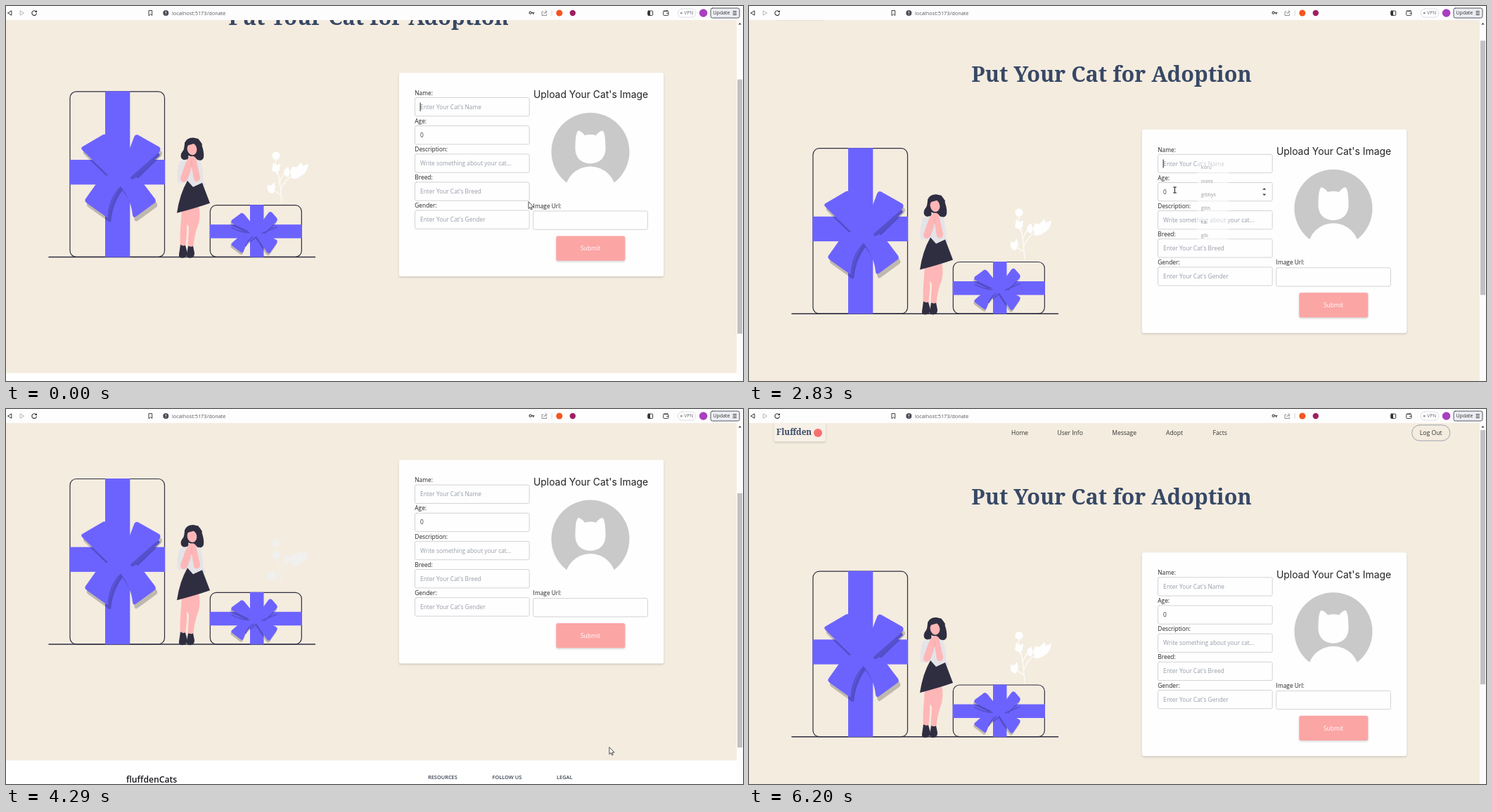
An HTML page with a canvas that plays this animation: 1048x534 px, repeating every 6300 ms.

```html
<!DOCTYPE html>
<html lang="en">
<head>
<meta charset="utf-8">
<title>Put Your Cat for Adoption</title>
<style>
html, body { margin: 0; width: 100%; height: 100%; overflow: hidden; background: #fff; }
canvas { display: block; width: 1048px; height: 534px; }
</style>
</head>
<body>
<canvas id="stage" width="1048" height="534"></canvas>
<script>
const g = document.getElementById('stage').getContext('2d');
const LOOP = 6300, STEP = LOOP / 50;
const SANS = '"Open Sans", "Noto Sans", sans-serif';
const SERIF = '"Noto Serif", serif';
const INK = '#2f2e41', VIOLET = '#6c63ff', SHADE = '#5650cc', SKIN = '#ffb6b6', PAPER = '#fefefe', BG = '#f4ecdf';

const ease = (t, from, to) => {
  const k = Math.min(1, Math.max(0, (t - from) / (to - from)));
  return k * k * (3 - 2 * k);
};
const within = (t, a, b) => t >= a && t < b;

const scrollAt = t => 109.3 + ease(t, 0, 120)
  - 55.3 * ease(t, 750, 1030)
  - 55 * ease(t, 2650, 2900)
  + 131.7 * ease(t, 3430, 3900)
  - 131.7 * ease(t, 4290, 4530);

// resting places of the mouse: time, x, y
const STOPS = [[0, 743, 279], [370, 800, 303], [740, 598, 277.5], [1500, 618, 221.5], [1880, 616, 195],
  [2770, 605.5, 262], [3900, 586, 312.5], [4280, 858, 482], [4530, 751, 446], [5050, 751, 446], [5530, 985, 560]];
function mouseAt(t) {
  let [, x, y] = STOPS[0];
  for (let i = 1; i < STOPS.length; i++) {
    const k = ease(t, STOPS[i - 1][0], STOPS[i][0]);
    x += (STOPS[i][1] - x) * k;
    y += (STOPS[i][2] - y) * k;
  }
  return [x, y];
}

function text(str, x, y, size, color, { font = SANS, weight = 400, align = 'left' } = {}) {
  g.font = `${weight} ${size}px ${font}`;
  g.fillStyle = color;
  g.textAlign = align;
  g.fillText(str, x, y + size * 0.35);
}
function rect(x, y, w, h, color) {
  g.fillStyle = color;
  g.fillRect(x, y, w, h);
}
function box(x, y, w, h, r, fill, stroke, line = 1) {
  g.beginPath();
  g.roundRect(x, y, w, h, r);
  if (fill) { g.fillStyle = fill; g.fill(); }
  if (stroke) { g.strokeStyle = stroke; g.lineWidth = line; g.stroke(); }
}
function raised(x, y, w, h, r, fill) {
  g.save();
  g.shadowColor = 'rgba(0,0,0,.16)';
  g.shadowBlur = 3;
  g.shadowOffsetY = 1.5;
  box(x, y, w, h, r, fill);
  g.restore();
}
function disc(x, y, rx, color, ry = rx, turn = 0) {
  g.beginPath();
  g.ellipse(x, y, rx, ry, turn, 0, 7);
  g.fillStyle = color;
  g.fill();
}
const paths = {};
const path = d => paths[d] || (paths[d] = new Path2D(d));
function fill(d, color) {
  g.fillStyle = color;
  g.fill(path(d));
}
function line(d, color, w) {
  g.strokeStyle = color;
  g.lineWidth = w;
  g.lineCap = g.lineJoin = 'round';
  g.stroke(path(d));
}

const BIG_BOW = 'M108 310Q106 312 109 315L145 350Q135 352 130 360L113 384Q111 387 115 390L143 410' +
  'Q147 413 147 407C149 392 154 378 163 366C172 378 179 392 180 407Q181 412 185 409L211 390' +
  'Q214 388 212 384L196 363Q191 355 182 352L218 317Q221 313 218 310L188 293Q184 291 182 296L176 312' +
  'L163 322L143 293Q140 291 137 293Z';
const SMALL_BOW = 'M356 427L339 406Q335 402 332 406L321 414Q319 417 322 419L345 430Q331 437 321 447' +
  'Q319 449 322 451L334 460Q337 462 338 458L342 448L356 437L371 460Q374 463 376 460L385 447' +
  'Q387 444 384 442L367 433L384 417Q387 414 385 411L378 403Q375 401 373 404Z';

function gift(x, y, w, h, ribbonX, ribbonY, ribbonW) {
  box(x, y, w, h, 9, null, INK, 1.2);
  rect(ribbonX, y - .5, ribbonW, h + .7, VIOLET);
  rect(x - .6, ribbonY, w + 1.2, ribbonW, VIOLET);
}
function bow(d, dx, dy) {
  g.save();
  g.translate(dx, dy);
  fill(d, 'rgba(0,0,0,.22)');
  g.restore();
  fill(d, VIOLET);
}

function gifts() {
  line('M61 466.7H439.5', INK, 1.5);
  gift(91, 231.2, 134.5, 235.5, 141, 328.3, 35.3);
  bow(BIG_BOW, 2.5, 6);
  fill('M177 353L217 318L219 322L183 355Q177 358 177 353Z', SHADE);
  fill('M163 366C155 375 148 390 147 410L145 417C143 398 151 376 163 366Z', SHADE);
  gift(290.3, 393, 130, 73.7, 347, 420.5, 19.5);
  bow(SMALL_BOW, -1, 3);
  line('M321 425Q337 433 346 432M364 433L385 424M341 451Q344 443 351 438', SHADE, 1.6);
}

function woman() {
  fill('M250 396L274 394C277 408 275 418 271 427C268 438 267 446 266 455L259 455C258 444 260 436 260 424' +
    'L257 420C258 432 256 442 255 454L248 454C247 440 248 424 249 414Z', SKIN);
  fill('M248 449Q252 452 255 450L258 461Q257 468 251 468Q245 468 246 463Z', INK);
  fill('M259 451Q264 453 266 451L268 461Q268 468 262 468Q256 468 257 463Z', INK);
  fill('M258 299C266 294 276 298 278 306C280 312 282 319 281 325C279 331 272 330 270 326L259 322' +
    'C261 327 257 331 252 328C247 326 248 319 252 315C255 310 252 303 258 299Z', INK);
  fill('M247 331Q255 326 263 328L276 329Q281 345 280 358L285 364Q275 369 266 367L258 361L244 361Q242 345 247 331Z', '#e4e4e8');
  fill('M258 358L266 367L279 361L290 390Q270 397 243 404Q247 377 258 358Z', INK);
  disc(264.5, 313, 6.8, SKIN, 8.6, -.2);
  fill('M255 310C260 306 266 307 270 303L275 314L279 306L273 298L262 298L254 304Z', INK);
  fill('M259 326C262 322 268 322 270 326L276 353C276 360 269 361 267 356L264 337L257 357' +
    'C254 362 248 360 248 354L255 334Z', SKIN);
  line('M264 329V339M257 357L263 342', '#e89fa3', .6);
}

function plant(color) {
  line('M392 390Q390 358 386 344M391 370Q397 356 408 350M390 378Q383 374 380 371M388 351Q382 345 384 326' +
    'M389 361Q392 351 399 344', color, 1.1);
  disc(384, 322.5, 5.6, color);
  fill('M380 332L384 336L390 334L389 343Q384 349 378 343Z', color);
  fill('M404 345L407 338L413 339L420 332L422 337L430 334Q429 346 420 351Q414 356 406 355Z', color);
  fill('M396 342L401 338L404 346L401 353L395 349Z', color);
  fill('M372 364L377 365L381 360L383 368L380 376Q373 377 372 370Z', color);
}

function avatar() {
  disc(831, 316.8, 55.5, '#c9c9c9');
  disc(831, 374, 36.3, PAPER);
  fill('M809.5 313C809.5 303 810 290 813.5 286.8C816 286.5 820 289.5 823 293.5Q831 291 839 293.5' +
    'C842 289.5 846 286.5 848.5 286.8C852 290 852.5 303 852.5 313C852 327 842 333.5 831 333.5' +
    'C820 333.5 810 327 809.5 313Z', PAPER);
}

const FIELDS = [
  ['Name:', "Enter Your Cat's Name"],
  ['Age:', '0'],
  ['Description:', 'Write something about your cat...'],
  ['Breed:', "Enter Your Cat's Breed"],
  ['Gender:', "Enter Your Cat's Gender"]
];
const AGE = 1;
const fieldTop = i => 239.8 + i * 40.15;
const caret = (x, y) => rect(x, y, 1, 12, '#222');
const input = (x, y) => box(x, y, 162.7, 26.3, 2, PAPER, '#d3d3d8');

function form(ui) {
  raised(558.8, 204.2, 376.5, 290, 3, PAPER);
  FIELDS.forEach(([label, hint], i) => {
    const y = fieldTop(i);
    text(label, 581.3, y - 6.7, 8.35, '#222');
    input(581.5, y);
    text(hint, 589, y + 13.3, 8.33, i === AGE ? '#333' : '#959ca8');
  });
  if (ui.nameCaret) caret(588.6, 247);
  if (ui.ageFocus) caret(593.3, 287);
  if (ui.spinner) {
    if (ui.ageFocus) rect(728, 284, 10, 18, '#efefef');
    fill('M730.2 290.2L732.7 287.4L735.2 290.2ZM730.2 296L732.7 298.8L735.2 296Z', '#444');
  }
  text("Upload Your Cat's Image", 831.5, 235.8, 13.9, '#222', { font: 'Inter, sans-serif', align: 'center' });
  avatar();
  text('Image Url:', 749.6, 394, 8.35, '#222');
  input(749.7, 401.3);
  if (ui.urlFocus) caret(757, 408);
  raised(782.3, 436.8, 98, 35.2, 2.5, '#fca5a5');
  text('Submit', 831, 454.7, 8.5, '#fff', { weight: 500, align: 'center' });
}

function header() {
  raised(35.5, 14, 73.5, 32.5, 4, '#f6f0e6');
  text('Fluffden', 39, 33, 11.7, '#374866', { font: SERIF, weight: 700 });
  disc(98, 34, 6, '#f87171');
  [['Home', 373], ['User Info', 438.5], ['Message', 516.3], ['Adopt', 593], ['Facts', 659.5]]
    .forEach(([s, x]) => text(s, x, 34, 8.5, '#333'));
  box(942.7, 22.8, 54, 22.4, 11, null, '#9ca3af');
  text('Log Out', 969.7, 34, 8.7, '#333', { align: 'center' });
}

function footer() {
  rect(0, 632, 1039, 140, '#fff');
  text('fluffdenCats', 171, 659.8, 12.2, '#18191f', { weight: 600 });
  ['RESOURCES', 'FOLLOW US', 'LEGAL']
    .forEach((s, i) => text(s, 600 + i * 91.5, 655.7, 7.4, '#374151', { weight: 600 }));
}

function page(scroll, ui) {
  g.save();
  g.beginPath();
  g.rect(0, 20, 1039, 514);
  g.clip();
  rect(0, 20, 1039, 514, BG);
  g.translate(0, -scroll);
  header();
  text('Put Your Cat for Adoption', 515.5, 125.5, 30.5, '#374866', { font: SERIF, weight: 700, align: 'center' });
  gifts();
  woman();
  plant(ui.plant);
  form(ui);
  footer();
  g.restore();
  rect(1039, 20, 9, 514, '#fcfcfc');
  rect(1040, 30 + scroll * .683, 7, 362, '#c1c1c1');
  fill('M1041.3 26.6L1043.5 23.8L1045.7 26.6Z', '#505050');
}

function toolbar() {
  rect(0, 0, 1048, 20, '#fdfdfd');
  line('M7.5 7L2.5 10L7.5 13Z', '#333', 1);
  line('M20.5 7L25.5 10L20.5 13Z', '#b5b5b5', 1);
  line('M42.6 7.9A3.3 3.3 0 1 0 43.4 10.5', '#333', 1.1);
  fill('M41 9L44 9L44 6Z', '#333');
  line('M203.3 6.5H207.7V13.5L205.5 11.5L203.3 13.5Z', '#444', 1);
  disc(227.3, 10, 4, '#4b4c55');
  line('M227.3 8V10M227.3 12V12.1', '#fff', 1);
  text('localhost:5173/donate', 236, 10, 7.35, '#5a5b64');
  line('M747.3 9.6H751M749.8 9.6V11.4M747.3 9.6A1.6 1.6 0 1 0 747.3 9.7', '#444', 1.2);
  line('M764 8H762V13.5H768.5V11.5M764.5 11Q765 8.5 768.8 8.3M767 6.3L769.2 8.3L767 10.3', '#777', .8);
  rect(775.7, 6, .8, 8, '#ccc');
  disc(786.8, 10, 4.5, '#f5551f');
  disc(805.8, 10, 4.2, '#9e1f63');
  box(912.7, 7, 7, 6.4, 1, null, '#333');
  rect(913, 7, 3, 6.4, '#333');
  box(934.7, 7.4, 7.2, 6, 1, null, '#444');
  line('M935 7.2L941 6.6M939.5 10.3H942', '#444', 1);
  box(955.3, 4, 25.6, 12, 6, '#fff', '#d5d6de', .8);
  disc(960.3, 10, 1.6, '#9a9ba8');
  text('VPN', 964.2, 10, 6.7, '#6b6c78');
  disc(991.6, 10, 5.8, '#a93fc0');
  box(1002, 3, 41, 14, 2.5, '#ecedf3', '#55565f');
  text('Update', 1005.5, 10, 7, '#333');
  for (let i = -1; i < 2; i++) rect(1033.6, 9.5 + i * 2.4, 5.2, 1, '#333');
}

const menuItems = (items, x, y, gap) => items.forEach((s, i) => text(s, x, y + i * gap, 7.1, '#444'));

function urlMenu() {
  raised(792, 322, 252, 84.5, 1, '#fff');
  fill('M799 322.5L803 319L807 322.5Z', '#fff');
  const typed = ['data', 'image/jpeg;base64,/9j/4AAQSkZJRgABAQAAAQABAAD/2wCEAAoHCBYWFRg'].join(':');
  g.save();
  g.beginPath();
  g.rect(792, 322, 246, 84);
  g.clip();
  menuItems(['gsfgsdfgs', 'gfsgsf', 'dafdaf', typed], 798.3, 335, 19.8);
  g.restore();
}
function nameMenu(alpha) {
  g.save();
  g.globalAlpha = alpha;
  rect(637, 215, 45, 125, '#fff');
  menuItems(['koru', 'mimi', 'gibbys', 'gibs', 'ka', 'gib'], 642.8, 229.8, 19.4);
  g.restore();
}

function mouse(x, y, beam) {
  g.save();
  g.translate(x, y);
  if (beam) {
    line('M-2 -4H2M0 -4V4M-2 4H2', '#222', 1);
  } else {
    const arrow = 'M0 0V9.6L2.2 7.6L3.7 11L5.3 10.3L3.8 7.1H6.8Z';
    fill(arrow, '#fff');
    line(arrow, '#222', .8);
  }
  g.restore();
}

function draw(time) {
  const t = Math.floor(time / STEP) * STEP;
  const scroll = scrollAt(t);
  const [x, y] = mouseAt(t);
  const over = (left, top) => within(x, left, left + 163) && within(y + scroll, top, top + 26.3);
  const ageFocus = within(t, 1160, 1760);
  const urlFocus = within(t, 370, 880);
  const nameFocus = t < 370 || t > 1880;
  page(scroll, {
    nameCaret: nameFocus && (t + 250) % 1000 < 400,
    ageFocus,
    urlFocus,
    spinner: ageFocus || over(581, fieldTop(AGE)),
    plant: within(t, 100, 2700) || within(t, 3500, 4400) ? '#f0f0ee' : PAPER
  });
  if (urlFocus) urlMenu();
  if (within(t, 1880, 2900)) nameMenu(1 - ease(t, 2650, 2900));
  mouse(x, y, over(749, 401) || FIELDS.some((_, i) => over(581, fieldTop(i))));
  toolbar();
}

const start = performance.now();
function tick() {
  draw((performance.now() - start) % LOOP);
  requestAnimationFrame(tick);
}
tick();
</script>
</body>
</html>
```
